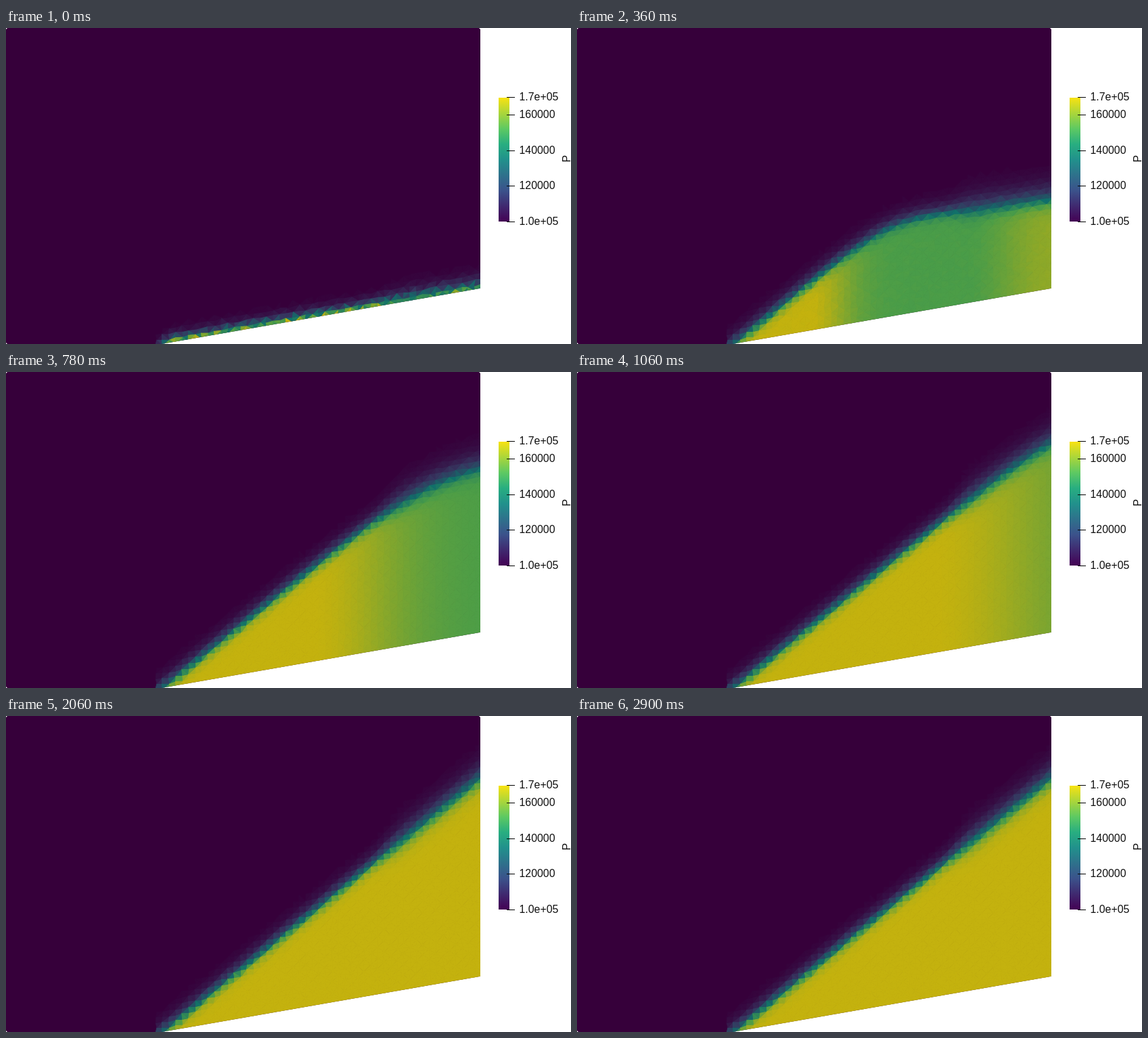
Recreate the animation shown at these times as an HTML page with a canvas. Size 835x467 px, loop 2920 ms.

```html
<!DOCTYPE html>
<html lang="en">
<head>
<meta charset="utf-8">
<title>Oblique shock</title>
<style>
  html, body { margin: 0; width: 835px; height: 467px; overflow: hidden; background: #fff; }
  canvas, svg { position: absolute; left: 0; top: 0; display: block; }
  text { font: 15.9px "Liberation Sans", Arial, sans-serif; fill: #111; }
</style>
</head>
<body>
<canvas id="field" width="835" height="467"></canvas>
<svg id="legend" width="835" height="467" viewBox="0 0 835 467">
  <defs>
    <linearGradient id="ramp" x1="0" y1="1" x2="0" y2="0">
      <stop offset="0" stop-color="#440154"/>
      <stop offset=".25" stop-color="#3b528b"/>
      <stop offset=".5" stop-color="#21918c"/>
      <stop offset=".625" stop-color="#28ae80"/>
      <stop offset=".75" stop-color="#5ec962"/>
      <stop offset="1" stop-color="#f8e212"/>
    </linearGradient>
  </defs>
  <rect x="728" y="103" width="16" height="183" fill="url(#ramp)"/>
  <g id="ticks"></g>
  <text transform="translate(834 198.5) rotate(-90)">P</text>
</svg>
<script>
const LOOP = 2920, STEP = 20;
const ctx = document.getElementById('field').getContext('2d');

// Pressure 100000 sits at y = 286 and 160000 at y = 128.
const tickY = p => Math.round(286 - (p - 1e5) * 158 / 6e4);
const tick = (y, label) =>
  `<path d="M740 ${y + .5}h12" stroke="#000"/><text x="758.5" y="${y + 5}">${label}</text>`;
document.getElementById('ticks').innerHTML = tick(102, '1.7e+05') + tick(286, '1.0e+05') +
  [160000, 140000, 120000].map(p => tick(tickY(p), p)).join('');

const clamp01 = v => Math.min(1, Math.max(0, v));
const smoothstep = (a, b, v) => {
  const u = clamp01((v - a) / (b - a));
  return u * u * (3 - 2 * u);
};
const smoothMax = (a, b, k) => Math.max(a, b) + k * Math.log1p(Math.exp(-Math.abs(a - b) / k));

const colorKeys = [
  { at: 0, rgb: [54, 0, 58] },
  { at: .25, rgb: [54, 55, 96] },
  { at: .5, rgb: [16, 112, 106] },
  { at: .7, rgb: [74, 157, 72] },
  { at: .93, rgb: [196, 178, 14] }
];
function colorOf(value) {
  const next = Math.max(1, colorKeys.findIndex(key => key.at >= value));
  const from = colorKeys[next - 1], to = colorKeys[next];
  const u = (value - from.at) / (to.at - from.at);
  return `rgb(${from.rgb.map((c, i) => Math.round(c + (to.rgb[i] - c) * u)).join()})`;
}

const wall = x => Math.min(467, 467 - (x - 230) * 82 / 470);
const attachedShock = x => 462 - .801 * (x - 237);
const movingFront = (x, t) =>
  378 - 775 * (1 - Math.exp(-t / 2000)) + (700 - x) * Math.max(.1, .174 - .00015 * t);

// Pressure behind the shock depends on the distance from the corner over time.
function plateau(x, t) {
  const ray = (x - 250) / Math.max(t, 1);
  const fan = Math.max(0, ray - .26) / .17;
  return .7 + .23 * Math.exp(-fan * fan) + .13 * smoothstep(.9, 1.25, ray);
}

function pressure({ x, y, noise }, t) {
  const center = smoothMax(attachedShock(x), movingFront(x, t), Math.min(34, 2 + .045 * t));
  const width = Math.min(1, .6 + t / 500) * (.8 + .4 * smoothstep(540, 590, x));
  const depth = (y - center) / width;
  const rise = 1 / (1 + Math.exp(-depth / (depth < 0 ? 10 : 6)));
  const jitter = noise * (.2 * Math.exp(-t / 100) + .05 * (1 - rise));
  return Math.min(.93, rise * (plateau(x, t) + jitter));
}

let seed = 7;
function random() {
  seed = (seed * 16807) % 2147483647;
  return seed / 2147483647;
}

function buildMesh() {
  const columns = 50, rows = 50, dx = 9.62, dy = 8;
  const wobble = () => (random() - .5) * 2.5;
  const nodes = Array.from({ length: columns + 1 }, (_, i) =>
    Array.from({ length: rows + 1 }, (_, j) => {
      const x = 222 + i * dx + wobble();
      return [x, wall(x) + 2 - j * dy + (j ? wobble() : 0)];
    }));
  const cells = [];
  const mean = (corners, axis) => corners.reduce((sum, p) => sum + p[axis], 0) / 3;
  const add = (...corners) => cells.push({
    corners, x: mean(corners, 0), y: mean(corners, 1), noise: random() * 2 - 1
  });
  for (let i = 0; i < columns; i++) {
    for (let j = 0; j < rows; j++) {
      const a = nodes[i][j], b = nodes[i + 1][j], c = nodes[i + 1][j + 1], d = nodes[i][j + 1];
      if ((i + j) % 2) { add(a, b, c); add(a, c, d); }
      else { add(a, b, d); add(b, c, d); }
    }
  }
  return cells;
}

const mesh = buildMesh();
const domain = new Path2D('M0 2L2 0H699L701 2V384.8L230 467H2L0 465Z');

function draw(t) {
  ctx.clearRect(0, 0, 835, 467);
  ctx.save();
  ctx.fillStyle = colorOf(0);
  ctx.fill(domain);
  ctx.clip(domain);
  for (const cell of mesh) {
    const value = pressure(cell, t);
    if (value < .015) continue;
    ctx.fillStyle = ctx.strokeStyle = colorOf(value);
    ctx.beginPath();
    for (const [x, y] of cell.corners) ctx.lineTo(x, y);
    ctx.closePath();
    ctx.fill();
    ctx.stroke();
  }
  ctx.restore();
}

const start = performance.now();
let shown = -1;
function update() {
  const elapsed = Math.max(0, performance.now() - start) % LOOP;
  const t = Math.floor(elapsed / STEP) * STEP;
  if (t !== shown) draw(shown = t);
  requestAnimationFrame(update);
}
update();
</script>
</body>
</html>
```
